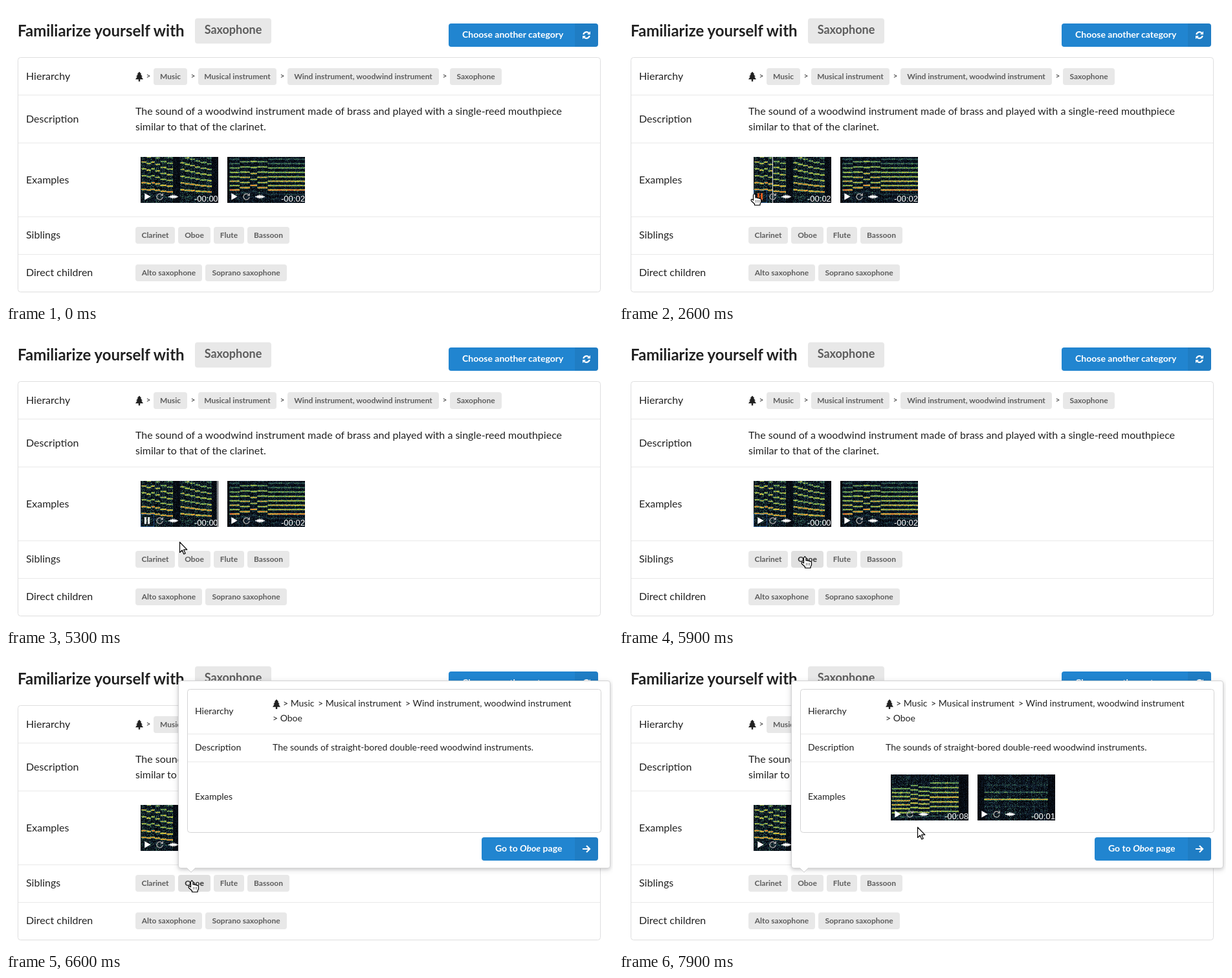
Write an HTML page with a canvas that moves like this. It is 938 by 457 pixels and loops after 8000 ms.

```html
<!DOCTYPE html>
<html lang="en">
<head>
<meta charset="utf-8">
<title>Category page</title>
<style>
html, body { margin: 0; width: 100%; height: 100%; overflow: hidden; background: #fff; }
#stage { position: relative; width: 938px; height: 457px; overflow: hidden; }
#stage > svg, #popup, #popup > svg { position: absolute; left: 0; top: 0; width: 938px; height: 457px; }
svg { display: block; overflow: hidden; }
text { font-family: Lato, sans-serif; font-size: 16px; fill: rgba(0,0,0,.87); white-space: pre; }
.title { font-size: 24px; font-weight: 700; }
.big { font-size: 18px; font-weight: 700; fill: rgba(0,0,0,.6); }
.label rect { fill: #e8e8e8; }
.label text { font-size: 12px; font-weight: 700; fill: rgba(0,0,0,.6); text-anchor: middle; }
.small { font-size: 12px; }
.button text { font-size: 14px; font-weight: 700; fill: #fff; }
.icon { fill: none; stroke: #fff; stroke-width: 2.2; }
.frame { fill: none; stroke: #dededf; }
.line { stroke: #e9e9e9; }
.thumb { position: absolute; width: 120px; height: 71px; }
.thumb > * { position: absolute; left: 0; top: 0; }
.thumb text { font: 13px "Liberation Sans", Arial, sans-serif; fill: #fff; }

#popup { transform-origin: 267px 331px; }
#popup text { font-size: 14px; }
#popup .thumb text { font-size: 13px; }
.box { position: absolute; left: 266px; top: 41px; width: 668px; height: 290px; box-sizing: border-box;
  background: #fff; border: 1px solid #d4d4d5; border-radius: 4px;
  box-shadow: 0 2px 4px rgba(34,36,38,.12), 0 2px 10px rgba(34,36,38,.15); }

/* Everything advances in hard 100 ms ticks: 1.25% of the loop each. */
#popup, .load1, .load2, .cursor, .hand, .arrow, .hover rect, .hover text, .player .play,
.player .pause, .player .focus, .digits, .head, .tip { animation: 8s step-end -10ms infinite; }

#popup { animation-name: popup; }
.load1 { animation-name: load1; }
.load2 { animation-name: load2; }
.cursor { animation-name: move; }
.hand { animation-name: hand; }
.arrow { animation-name: arrow; }
.hover rect { animation-name: hover-fill; }
.hover text { animation-name: hover-text; }
.player .play { animation-name: play, tint; }
.player .pause { animation-name: pause, tint; }
.player .focus { animation-name: focus; }
.digits { animation-name: digits; }
.head { animation-name: head; }
.tip { animation-name: tip; }

@keyframes popup {
  0% { opacity: 0; transform: scale(.8); clip-path: inset(0); }
  80% { opacity: .7; transform: scale(.941); clip-path: inset(0 10px 0 0); }
  81.25% { opacity: .98; transform: scale(.997); clip-path: inset(0); }
  82.5%, 100% { opacity: 1; transform: none; clip-path: inset(0); }
}
@keyframes load1 { 0% { opacity: 0; } 83.75%, 100% { opacity: 1; } }
@keyframes load2 { 0% { opacity: 0; } 85%, 100% { opacity: 1; } }
@keyframes hand {
  0% { opacity: 0; } 16.25% { opacity: 1; } 62.5% { opacity: 0; }
  71.25% { opacity: 1; } 90%, 100% { opacity: 0; }
}
@keyframes arrow {
  0% { opacity: 1; } 16.25% { opacity: 0; } 62.5% { opacity: 1; }
  71.25% { opacity: 0; } 90%, 100% { opacity: 1; }
}
@keyframes hover-fill { 0%, 90%, 100% { fill: #e8e8e8; } 71.25% { fill: #e0e0e0; } }
@keyframes hover-text { 0%, 90%, 100% { fill: rgba(0,0,0,.6); } 71.25% { fill: rgba(0,0,0,.8); } }
@keyframes tint { 0%, 62.5%, 100% { fill: #fff; } 17.5% { fill: #e2571e; } }
@keyframes play { 0%, 67.5%, 100% { opacity: 1; } 21.25% { opacity: 0; } }
@keyframes pause { 0%, 67.5%, 100% { opacity: 0; } 21.25% { opacity: 1; } }
@keyframes focus { 0%, 77.5%, 100% { opacity: 0; } 21.25% { opacity: 1; } }
@keyframes digits {
  0%, 53.75%, 100% { transform: none; }
  21.25% { transform: translateY(-60px); }
  28.75% { transform: translateY(-40px); }
  43.75% { transform: translateY(-20px); }
}
@keyframes head {
  0%, 67.5%, 100% { transform: translateX(-9px); }
  22.5% { transform: translateX(2px); }
  26.25% { transform: translateX(12px); }
  28.75% { transform: translateX(19px); }
  32.5% { transform: translateX(29px); }
  36.25% { transform: translateX(39px); }
  40% { transform: translateX(49px); }
  43.75% { transform: translateX(59px); }
  47.5% { transform: translateX(69px); }
  50% { transform: translateX(76px); }
  53.75% { transform: translateX(85px); }
  57.5% { transform: translateX(95px); }
  60% { transform: translateX(102px); }
  63.75% { transform: translateX(112px); }
  66.25% { transform: translateX(118px); }
}
@keyframes tip {
  0%, 60%, 100% { opacity: 0; }
  47.5% { opacity: .58; } 48.75% { opacity: .85; } 50% { opacity: 1; }
}
@keyframes move {
  0% { transform: translate(-60px, -60px); }
  5% { transform: translate(412px, 440px); }
  6.25% { transform: translate(392px, 424px); }
  7.5% { transform: translate(362px, 402px); }
  8.75% { transform: translate(326px, 378px); }
  10% { transform: translate(288px, 354px); }
  11.25% { transform: translate(258px, 336px); }
  12.5% { transform: translate(236px, 322px); }
  13.75% { transform: translate(222px, 311px); }
  15% { transform: translate(213px, 305px); }
  16.25% { transform: translate(211px, 301px); }
  17.5% { transform: translate(209px, 295px); }
  18.75% { transform: translate(209px, 290px); }
  40% { transform: translate(210px, 290px); }
  41.25% { transform: translate(211px, 291px); }
  60% { transform: translate(214px, 295px); }
  61.25% { transform: translate(221px, 301px); }
  62.5% { transform: translate(232px, 309px); }
  63.75% { transform: translate(245px, 316px); }
  65% { transform: translate(257px, 322px); }
  66.25% { transform: translate(268px, 327px); }
  67.5% { transform: translate(274px, 331px); }
  68.75% { transform: translate(278px, 335px); }
  70% { transform: translate(281px, 339px); }
  71.25% { transform: translate(284px, 343px); }
  72.5% { transform: translate(286px, 348px); }
  73.75% { transform: translate(287px, 350px); }
  87.5% { transform: translate(290px, 347px); }
  88.75% { transform: translate(299px, 341px); }
  90% { transform: translate(311px, 332px); }
  91.25% { transform: translate(326px, 322px); }
  92.5% { transform: translate(343px, 312px); }
  93.75% { transform: translate(363px, 301px); }
  95% { transform: translate(386px, 290px); }
  96.25% { transform: translate(412px, 280px); }
  97.5% { transform: translate(438px, 272px); }
  98.75%, 100% { transform: translate(461px, 267px); }
}
</style>
</head>
<body>
<div id="stage">
  <svg>
    <defs>
      <path id="tree" d="M6 0 9.4 3.8H8L10.8 7.6H9.2L12 11.8H7.2V15H4.8V11.8H0L2.8 7.6H1.2L4 3.8H2.6Z" fill="rgba(0,0,0,.87)"/>
      <g id="turn">
        <path d="M-4.7-.9A4.8 4.8 0 0 1 3.6-3.2" class="icon"/>
        <path d="M6-6V-1H1Z" fill="#fff"/>
      </g>
      <path id="play" d="M6.3 56 15.6 61.3 6.3 66.6Z"/>
      <g id="tools">
        <path d="M33 58.6A4.5 4.5 0 1 0 34 62" fill="none" stroke="#a5a5a5" stroke-width="1.5"/>
        <path d="M35 55.5V60.2H30.3Z" fill="#a5a5a5"/>
        <path d="M43 61 46 60.4 47 58.5 48 60.4 49.5 57.8 51 60.4 52 57.6 53 60.4 54.5 59 55.5 60.5 58 61V62L55.5 62.4 54.5 64 53 62.4 52 65.2 51 62.4 49.5 65 48 62.4 47 64.3 46 62.5 43 62Z" fill="#fff"/>
      </g>
    </defs>

    <text class="title" x="18" y="47">Familiarize yourself with</text>
    <rect x="292" y="19" width="118" height="39" rx="4" fill="#e8e8e8"/>
    <text class="big" x="351" y="43" text-anchor="middle">Saxophone</text>

    <g class="button">
      <rect x="684" y="27" width="231" height="36" rx="4" fill="#2185d0"/>
      <path d="M879 27H911Q915 27 915 31V59Q915 63 911 63H879Z" fill="rgba(0,0,0,.06)"/>
      <text x="705" y="49">Choose another category</text>
      <use href="#turn" transform="translate(897 45)"/>
      <use href="#turn" transform="translate(897 45) rotate(180)"/>
    </g>

    <rect class="frame" x="18.5" y="79.5" width="900" height="362" rx="4"/>
    <path class="line" d="M19 137.5H918M19 211.5H918M19 325.5H918M19 383.5H918"/>
    <text x="31" y="114">Hierarchy</text>
    <text x="31" y="180">Description</text>
    <text x="31" y="274">Examples</text>
    <text x="31" y="359">Siblings</text>
    <text x="31" y="417">Direct children</text>
    <use href="#tree" x="200" y="101.5"/>
    <g id="marks"></g>
    <text x="200" y="168">The sound of a woodwind instrument made of brass and played with a single-reed mouthpiece</text>
    <text x="200" y="192">similar to that of the clarinet.</text>
    <g id="labels"></g>
  </svg>

  <div class="thumb player" style="left:208px;top:233px">
    <canvas width="120" height="71"></canvas>
    <svg width="120" height="71">
      <rect class="head" width="1" height="71" fill="#e8e8e8"/>
      <rect class="focus" x=".5" y="51.5" width="20" height="19" fill="none" stroke="#2a78d8" stroke-dasharray="1 1"/>
      <use class="play" href="#play" fill="#fff"/>
      <path class="pause" d="M6 56H9V66.5H6ZM11 56H14V66.5H11Z" fill="#fff"/>
      <use href="#tools"/>
      <text x="83" y="69">-00:0</text>
      <svg x="112" y="57" width="8" height="14">
        <g class="digits">
          <text x=".3" y="12">0</text><text x=".3" y="32">1</text>
          <text x=".3" y="52">2</text><text x=".3" y="72">3</text>
        </g>
      </svg>
    </svg>
  </div>
  <div class="thumb" style="left:342px;top:233px" data-time="-00:02"></div>

  <svg>
    <g class="tip">
      <rect x="211" y="316" width="81" height="24" rx="4" fill="rgba(0,0,0,.8)"/>
      <text x="251.5" y="333" text-anchor="middle" style="font:13px 'Noto Sans',sans-serif;fill:#fff">play / pause</text>
    </g>
  </svg>

  <div id="popup">
    <div class="box"></div>
    <svg>
      <path d="M279.5 330 286 336.5 292.5 330" fill="#fff"/>
      <path d="M279.5 330.5 286 337 292.5 330.5" fill="none" stroke="#cfcfd0"/>
      <rect class="frame" x="280.5" y="54.5" width="639" height="221" rx="4" style="stroke:#d4d4d5"/>
      <path class="line" d="M281 123.5H919M281 166.5H919"/>
      <text x="292" y="93">Hierarchy</text>
      <text x="292" y="149">Description</text>
      <text x="292" y="225">Examples</text>
      <use href="#tree" x="412" y="70"/>
      <text x="428" y="81">&gt; Music</text>
      <text x="482" y="81">&gt; Musical instrument</text>
      <text x="617" y="81">&gt; Wind instrument, woodwind instrument</text>
      <text x="412" y="104">&gt; Oboe</text>
      <text x="412" y="149">The sounds of straight-bored double-reed woodwind instruments.</text>
      <g class="button">
        <rect x="735" y="283" width="180" height="36" rx="4" fill="#2185d0"/>
        <path d="M879 283H911Q915 283 915 287V315Q915 319 911 319H879Z" fill="rgba(0,0,0,.06)"/>
        <text x="756" y="305" style="fill:#fff">Go to <tspan font-style="italic">Oboe</tspan> page</text>
        <path class="icon" d="M891 301H901.5M897 296 902 301 897 306"/>
      </g>
    </svg>
    <div class="thumb load1" style="left:420px;top:186px" data-time="-00:08"></div>
    <div class="thumb load2" style="left:554px;top:186px" data-time="-00:01"></div>
  </div>

  <svg>
    <g class="cursor" stroke="#000" fill="#fff" stroke-linejoin="round">
      <path class="arrow" d="M.5.5V16.5L4.2 13 6.8 19 9.2 18 6.6 12.2H11.8Z" stroke-width="1.2"/>
      <g class="hand">
        <path transform="translate(-5.5 0)" stroke-width="1.2" d="M4 2Q4 .5 5.8.5T7.5 2V6Q9 5 10.5 6.5 12 5.8 13.2 7.2 15 6.8 16 8.5V13L14.5 15.5V17.5H6V15.5L1 11Q0 9.5 1.2 8.6 2.5 8 4 10Z"/>
        <path d="M2.5 10V14M5 10V14M7.5 10V14" stroke-dasharray="1 1" fill="none"/>
      </g>
    </g>
  </svg>
</div>

<script>
const $ = (sel) => document.querySelector(sel);

const label = ([x, y, w, name]) =>
  `<g class="label${name === 'Oboe' ? ' hover' : ''}">
    <rect x="${x}" y="${y}" width="${w}" height="26" rx="4"/>
    <text x="${x + w / 2}" y="${y + 17}">${name}</text></g>`;

$('#labels').innerHTML = [
  [228, 96, 52, 'Music'], [297, 96, 121, 'Musical instrument'],
  [435, 96, 234, 'Wind instrument, woodwind instrument'], [686, 96, 80, 'Saxophone'],
  [200, 341, 61, 'Clarinet'], [266, 341, 50, 'Oboe'], [321, 341, 47, 'Flute'], [373, 341, 65, 'Bassoon'],
  [200, 399, 103, 'Alto saxophone'], [308, 399, 126, 'Soprano saxophone'],
].map(label).join('');

$('#marks').innerHTML = [216.5, 285.5, 423.5, 674.5]
  .map((x) => `<text class="small" x="${x}" y="112">&gt;</text>`).join('');

document.querySelectorAll('[data-time]').forEach((el) => {
  el.innerHTML = `<canvas width="120" height="71"></canvas><svg width="120" height="71">
    <use href="#play" fill="#fff"/><use href="#tools"/>
    <text x="83" y="69">${el.dataset.time}</text></svg>`;
});

function random(seed) {
  return () => {
    seed = (seed * 1664525 + 1013904223) % 4294967296;
    return seed / 4294967296;
  };
}

// Level 0..1 to black, blue, green, yellow, orange.
const ramp = [[2, 3, 6], [22, 40, 62], [62, 122, 88], [160, 195, 70], [232, 190, 52], [232, 92, 40]];
function shade(v) {
  const s = Math.min(v, .999) * 5, i = Math.floor(s);
  return ramp[i].map((c, j) => c + (ramp[i + 1][j] - c) * (s - i));
}

// Each note is [start, end, harmonic spacing]; gains weigh the harmonics.
function paint(canvas, { notes, gains, noise, seed }) {
  const ctx = canvas.getContext('2d'), img = ctx.createImageData(120, 71), rand = random(seed);
  const column = Array.from({ length: 120 }, () => .6 + rand() * .6);
  for (let y = 0; y < 71; y++) {
    for (let x = 0; x < 120; x++) {
      const f = 71 - y, note = notes.find(([a, b]) => x >= a && x < b);
      let v = noise * rand() ** 2 * column[x] * (note ? 1 : .45);
      if (note) {
        const soft = x === note[0] ? .5 : 1;
        gains.forEach((g, k) => {
          const d = (f - k * note[2]) / 1.15;
          v += g * soft * (.8 + rand() * .25) * Math.exp(-d * d);
        });
      }
      img.data.set([...shade(v), 255], (y * 120 + x) * 4);
    }
  }
  ctx.putImageData(img, 0, 0);
}

const sounds = [
  { seed: 7, noise: .38, gains: [0, .1, .95, .95, .6, .68, .66, .5, .32, .25],
    notes: [[1, 9, 10.6], [9, 16, 10.2], [16, 22, 10.6], [22, 30, 10], [30, 40, 9.2], [40, 50, 8.8],
      [61, 68, 10.4], [68, 76, 10], [76, 84, 9.7], [84, 92, 9.3], [92, 102, 9], [102, 110, 8.7]] },
  { seed: 21, noise: .3, gains: [0, .08, .15, 1.05, .7, .85, .68, .62, .5, .32, .25],
    notes: [[3, 19, 6.8], [19, 35, 8], [35, 46, 9.2], [46, 62, 8], [62, 120, 6.8]] },
  { seed: 33, noise: .36, gains: [0, .2, .62, .72, .78, .85, .62, .6, .5],
    notes: [[1, 30, 6.2], [30, 42, 6.8], [42, 60, 6.5], [60, 105, 7.3]] },
  { seed: 45, noise: .34, gains: [0, .08, .1, .82, .3, .12], notes: [[10, 109, 11]] },
];
document.querySelectorAll('canvas').forEach((c, i) => paint(c, sounds[i]));
</script>
</body>
</html>
```
